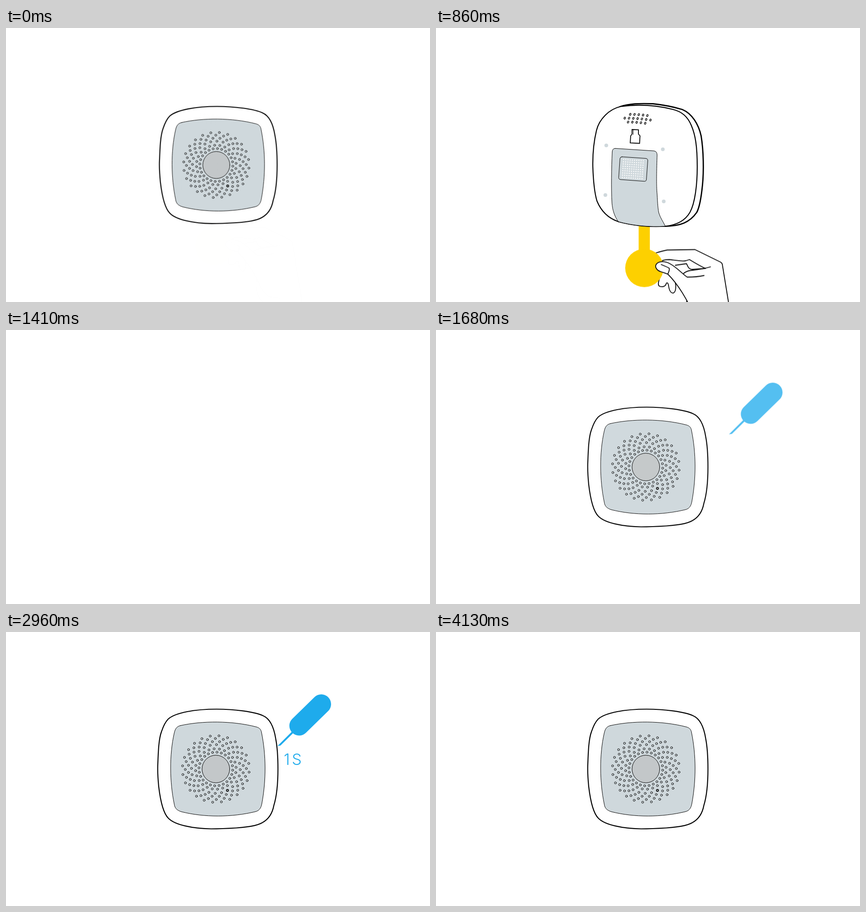
An HTML page for the animation above (4.7 s loop, 930x602 px).

```html
<!DOCTYPE html>
<html lang="en">
<head>
<meta charset="utf-8">
<title>Alarm setup</title>
<style>
  html, body { margin: 0; width: 100%; height: 100%; overflow: hidden; background: #fff; }
  svg { display: block; width: 100vw; height: 100vh; }
  .line { fill: none; stroke: #000; stroke-width: 1.8; stroke-linecap: round; stroke-linejoin: round; }
  .solid { fill: #fff; }
  .bold { stroke-width: 2.2; }
  .rim { stroke-width: 2.8; }
  .thin { stroke-width: 1; }
  .panel { fill: #cfd8dc; }
  .blue { fill: #00a0ea; }
  text { font: 300 34px Inter, Roboto, "Liberation Sans", sans-serif; }
  .digit { text-anchor: middle; }

  .anim { animation: 4.7s linear infinite; }
  #intro { animation-name: intro; }
  #back { animation-name: back; }
  #pull { animation-name: pull; }
  #front { animation-name: front; }
  #press { animation-name: press; }
  #pin { animation-name: pin; }
  #led { animation-name: led; }
  #three, #two, #one, #unit { animation-timing-function: step-end; }
  #three { animation-name: three; }
  #two { animation-name: two; }
  #one { animation-name: one; }
  #unit { animation-name: unit; }

  @keyframes intro { 0%, .32% { opacity: 1 } 6.36%, 100% { opacity: 0 } }
  @keyframes back {
    0%, .32% { opacity: 0 }
    6.36%, 22.13% { opacity: 1 }
    29.79%, 100% { opacity: 0 }
  }
  @keyframes pull {
    0%, 10.64% { transform: translateY(0); animation-timing-function: cubic-bezier(.333, 0, .667, 1) }
    22.13%, 100% { transform: translateY(65px) }
  }
  @keyframes front { 0%, 30.32% { opacity: 0 } 35.96%, 100% { opacity: 1 } }
  @keyframes press {
    0%, 34.04% { opacity: 0 }
    36.6%, 62.34% { opacity: 1 }
    68.09%, 100% { opacity: 0 }
  }
  @keyframes pin {
    0%, 34.04% { transform: translate(53px, -24px); animation-timing-function: cubic-bezier(.333, 0, .667, 1) }
    42.34%, 100% { transform: none }
  }
  @keyframes led {
    0%, 66% { opacity: 0 }
    73%, 73.9% { opacity: 1 }
    87.85%, 100% { opacity: 0 }
  }
  @keyframes three { 0% { opacity: 0 } 42.34% { opacity: 1 } 48.72%, 100% { opacity: 0 } }
  @keyframes two { 0% { opacity: 0 } 48.72% { opacity: 1 } 55.1%, 100% { opacity: 0 } }
  @keyframes one { 0% { opacity: 0 } 55.1%, 100% { opacity: 1 } }
  @keyframes unit { 0% { opacity: 0 } 42.34%, 100% { opacity: 1 } }
</style>
</head>
<body>
<svg viewBox="0 0 930 602">
  <defs>
    <radialGradient id="glow">
      <stop offset=".55" stop-color="#84da52"/>
      <stop offset="1" stop-color="#84da52" stop-opacity="0"/>
    </radialGradient>
    <g id="face">
      <path class="line solid bold" d="M462 169.500C500 169.500 545 175 564 184C580 191 588 212 591.500 234C595 252 596.500 275 596.500 301C596.500 330 594 360 587.500 381C584 400 575 412 562 419C550 426 530 428.500 505 430.500C480 432 465 432.500 450 432.500C410 432 370 424 356 409C344 397 338 365 335 340C333 320 332.500 300 333 290C334 262 335 235 341 219C345 207 350 197 356 191C372 177 415 169.500 462 169.500Z"/>
      <path class="line panel thin" d="M383 205.500C430 195 495 194.500 549 208.500C556 210.500 559.500 214 560.500 221C570.500 270 571 325 561 378C559.500 386 556 392 548 394.500C495 407.500 435 407.500 385 395C375 392 370 387 369 378C359 330 358 270 369 222C371 213 374 207.500 383 205.500Z"/>
      <circle class="line thin" cx="460.300" cy="301" r="30.300" style="fill:#c3c7c9"/>
      <g id="speaker" class="line thin"></g>
    </g>
  </defs>

  <g id="intro" class="anim">
    <use href="#face" transform="translate(465.9 301) scale(.979) translate(-465 -301)"/>
  </g>

  <g id="back" class="anim">
    <g id="pull" class="anim">
      <g class="line">
        <path class="solid" d="M470 450L482 446C495 442 502 440.500 507 439.500L568 438.500L624 466Q627.500 468 628 471L650 606"/>
        <path d="M494 464C500 460.500 506 460.500 512 460.500C528 462 538 465 548 463L556 460.500C565 466 578 474 591 480"/>
        <path d="M525 473L549.500 469.500C552 474 553 482 563 482L591 480"/>
        <path d="M543 491C548 487 552 485 558 484.500C575 483 590 480 602 476.500"/>
        <path class="solid" d="M490 503C488 510 486 516 490 519C497 522 504 519 505 513C507 510 509 512 510 517C511 525 514 534 520 534C526 533 527 520 525 512"/>
      </g>
      <path fill="#fdd000" d="M444.500 340H469V445H444.500Z"/>
      <circle cx="457" cy="479" r="42" fill="#fdd000"/>
      <g class="line">
        <path class="solid" d="M588 495.500C577 498 565 499 551 499C540 492 528 477 512 469C503 464 488 463 483 471C479 478 486 485 493 487C500 489.500 506 491 509 493C518 502 530 517 540 533C546 543 549 548 551 552"/>
        <path d="M494 471.500C500 474 508 477 511.500 479.500C512.500 483 510.500 488 508.500 492"/>
        <path d="M550 551C549 562 549 574 552 586C555 594 560 598 566 603"/>
        <path d="M551 552C556 568 566 583 576 589C584 593 592 592 600 594"/>
      </g>
    </g>

    <path class="line solid rim" d="M403 173C425 166 445 165.500 476 166.500C500 169 520 173 540 179C562 188 576 212 581.500 237C587 270 587.500 315 584.500 345C582 370 579 392 572 405C556 428 535 435 503 435.500L400 425Z"/>
    <path class="line solid bold" d="M405 172.500C380 178 358 200 352 225C346 250 343.500 280 344 305C345 335 347 360 353 380C362 402 378 418 400 425.500C430 434 470 438 503 435.500C528 433 546 424 557 405C568 385 573 345 573 305C573 260 569 235 560 214C552 195 540 184 520 179C480 169 445 167 405 172.500Z"/>
    <path class="line panel thin" d="M393 264.500L478 270Q485 271 485 279C484 310 483 345 485 365C486 385 487 400 489 407C492 417 498 425 503 435.500C470 438 430 434 400 425.500C392 415 387 400 386 385C384 350 385 310 386.500 272Q387 264.500 393 264.500Z"/>
    <path class="line thin" d="M408 283L460 286.500Q464.500 287 464.500 291L461.500 333Q461 337 457 336.800L405 333Q400.500 332.500 400.700 328.500L403.500 287Q404 283 408 283Z"/>
    <g id="grid" fill="#fff"></g>
    <g id="vents" class="line" style="stroke-width:1.35"></g>
    <path class="line" style="stroke-linejoin:miter" d="M430 223L444 223.500V233L447.500 237L446.500 253.500L426 252.500L427 237L430 233Z"/>
    <path class="line thin" d="M432.500 224V234"/>
    <g id="screws" class="panel"></g>
  </g>

  <g id="front" class="anim">
    <use href="#face"/>
    <circle id="led" class="anim" cx="466" cy="392" r="7.300" fill="url(#glow)"/>
  </g>

  <g id="press" class="anim blue">
    <g id="pin" class="anim">
      <path d="M595.500 250.500L629 217L632 220L602 249.500Z"/>
      <path d="M643 206L691.500 158.500" stroke="#00a0ea" stroke-width="43" stroke-linecap="round"/>
    </g>
    <text id="three" class="anim digit" x="616" y="291.500">3</text>
    <text id="two" class="anim digit" x="616" y="291.500">2</text>
    <text id="one" class="anim digit" x="616" y="291.500">1</text>
    <text id="unit" class="anim" x="627" y="291.500">S</text>
  </g>
</svg>
<script>
  const add = (id, tag, attrs) => {
    const el = document.createElementNS('http://www.w3.org/2000/svg', tag);
    for (const key in attrs) el.setAttribute(key, attrs[key]);
    document.getElementById(id).append(el);
  };

  // Rings of 24 holes, each turned a little against the one outside it
  [73.3, 67, 60.5, 53.5, 44.5, 37].forEach((radius, ring) => {
    for (let i = 0; i < 24; i++) {
      const angle = (5.4 - 6.3 * ring + 15 * i) * Math.PI / 180;
      const reset = ring === 3 && i === 11;
      add('speaker', 'circle', {
        cx: 460.2 + radius * Math.sin(angle),
        cy: 301 - radius * Math.cos(angle),
        r: 2.2,
        'stroke-width': reset ? 1.7 : 1
      });
    }
  });

  for (let row = 0; row < 9; row++)
    for (let col = 0; col < 10; col++)
      add('grid', 'circle', {
        cx: 411.5 + 4.8 * col - 0.35 * row,
        cy: 289 + 4.9 * row + 0.3 * col,
        r: 1.25
      });

  // Start x, start y, count
  [[426, 189.7, 5], [414, 198, 7], [421.3, 206.6, 5]].forEach(([x, y, count]) => {
    for (let i = 0; i < count; i++) {
      const cx = x + 9.4 * i, cy = y + 0.17 * i * i * (count > 5 ? 0.7 : 1);
      add('vents', 'ellipse', { cx, cy, rx: 1.6, ry: 2.3, transform: `rotate(18 ${cx} ${cy})` });
    }
  });

  [[373.5, 258], [497.5, 266.5], [371.5, 367], [499.5, 381]].forEach(([cx, cy]) =>
    add('screws', 'circle', { cx, cy, r: 4.1 }));
</script>
</body>
</html>
```
